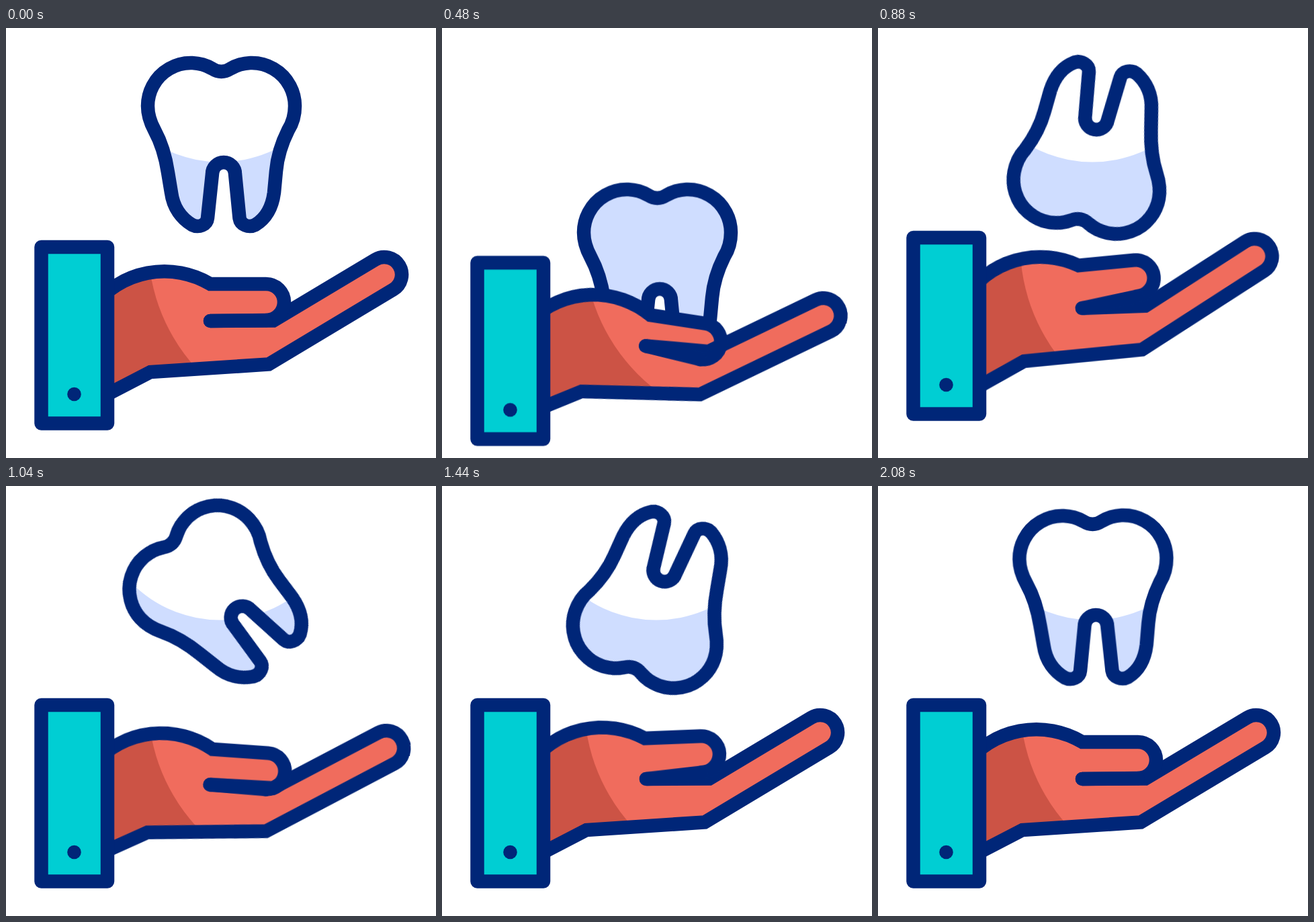
Write an HTML page that moves like this. It is 640 by 640 pixels and loops after 2.12 s.

```html
<!DOCTYPE html>
<html lang="en">
<head>
<meta charset="utf-8">
<title>Tooth care</title>
<style>
  html, body { margin: 0; width: 100%; height: 100%; overflow: hidden; background: #fff; }
  svg { display: block; width: 100%; height: 100%; }

  .line { fill: none; stroke: #002678; stroke-width: 20.5; stroke-linecap: round; }

  .lift, .turn, .thumb, .under, .drop, .spin {
    animation: 2120ms cubic-bezier(.333, 0, .667, 1) infinite;
  }
  .lift { animation-name: lift; }
  .turn { animation-name: turn; transform-origin: 150px 435px; }
  .thumb { animation-name: thumb; transform-origin: 165px 430px; }
  .under { animation-name: under; transform-origin: 304px 436px; }
  .drop { animation-name: drop; }
  .spin { animation-name: spin; transform-origin: 320.7px 174.6px; }

  /* sleeve and hand */
  @keyframes lift {
    0%, 7.547% { transform: translateY(0); }
    20.755% { transform: translateY(27px); }
    33.962% { transform: translateY(-36px); }
    47.17%, 100% { transform: translateY(0); }
  }
  @keyframes turn {
    0%, 9.434% { transform: rotate(0deg); }
    22.642% { transform: rotate(5.2deg); }
    35.849% { transform: rotate(-5.2deg); }
    49.057% { transform: rotate(3.2deg); }
    62.264%, 100% { transform: rotate(0deg); }
  }
  @keyframes thumb {
    0%, 9.434% { transform: rotate(0deg); }
    22.642% { transform: rotate(3.5deg); }
    35.849% { transform: rotate(-5.7deg); }
    51.887% { transform: rotate(1.4deg); }
    66.038% { transform: rotate(-2.4deg); }
    79.245%, 100% { transform: rotate(0deg); }
  }
  /* lower edge of the thumb, hinged at its root */
  @keyframes under {
    0%, 9.434% { transform: rotate(0deg); }
    22.642% { transform: rotate(9.2deg); }
    35.849% { transform: rotate(-15deg); }
    51.887% { transform: rotate(3.7deg); }
    66.038% { transform: rotate(-6.3deg); }
    79.245%, 100% { transform: rotate(0deg); }
  }

  /* tooth */
  @keyframes drop {
    0% { transform: translateY(0); }
    20.755% { transform: translateY(192px); }
    44.811%, 100% { transform: translateY(-8px); }
  }
  @keyframes spin {
    0% { transform: rotate(0deg); }
    22.642% { transform: rotate(0deg); animation-timing-function: cubic-bezier(.333, 0, .667, .535); }
    49.057% { transform: rotate(317deg); animation-timing-function: cubic-bezier(.333, .657, .667, 1); }
    100% { transform: rotate(720deg); }
  }
</style>
</head>
<body>
<svg viewBox="0 0 640 640">
  <defs>
    <path id="tooth" d="M307 60.6 A64 64 0 0 0 211 116 C211 130 215 141 221 152
      C233 174 238 195 241 215 L246 245 C249 268 262 284 277 293 C287 298 299 293 300 283
      L307 217 A17 17 0 0 1 341 217 L347.5 283 C349 293 361 298 371 293
      C386 284 396 268 399 245 L402 213 C404 190 410 172 420 152
      C427 141 430 130 430 116 A64 64 0 0 0 334 60.6 Q320.5 69 307 60.6Z"/>
    <path id="palm" d="M130 556 L215 512 L391 500.5 L576.4 389.3
      A26 26 0 0 0 549.6 344.7 L398 435.5 L304 436"/>
    <path id="top" d="M130 414 A134 134 0 0 1 304 381 H387 A27 27 0 0 1 387 435"/>

    <mask id="toothMask" maskUnits="userSpaceOnUse" x="0" y="0" width="640" height="640">
      <g class="drop"><g class="spin"><use href="#tooth" fill="#fff"/></g></g>
    </mask>
    <mask id="handMask" maskUnits="userSpaceOnUse" x="0" y="0" width="640" height="640">
      <g class="lift"><g class="turn" fill="#fff">
        <use href="#palm"/>
        <path d="M130 430 L200 410 L304 412 V436 L215 512 L130 556Z"/>
        <g class="thumb">
          <use href="#top"/>
          <path d="M130 414 L304 381 L387 435 L304 440 L130 470Z"/>
        </g>
      </g></g>
    </mask>
  </defs>

  <!-- the shading circles stay still while the shapes move through them -->
  <g mask="url(#toothMask)">
    <rect width="640" height="640" fill="#cfddff"/>
    <circle cx="319" cy="13.5" r="186" fill="#fff"/>
  </g>
  <g class="drop"><g class="spin"><use href="#tooth" class="line"/></g></g>

  <g mask="url(#handMask)">
    <rect width="640" height="640" fill="#cc5345"/>
    <circle cx="485" cy="322" r="273.5" fill="#f06c5d"/>
  </g>
  <g class="lift">
    <g class="turn line">
      <use href="#palm"/>
      <g class="thumb"><use href="#top"/></g>
      <path class="under" d="M304 436 L387 435"/>
    </g>
    <rect class="line" x="52.5" y="326" width="98.5" height="262.5" style="fill:#00ced3" stroke-linejoin="round"/>
    <circle cx="101.5" cy="545" r="10.3" fill="#002678"/>
  </g>
</svg>
</body>
</html>
```
